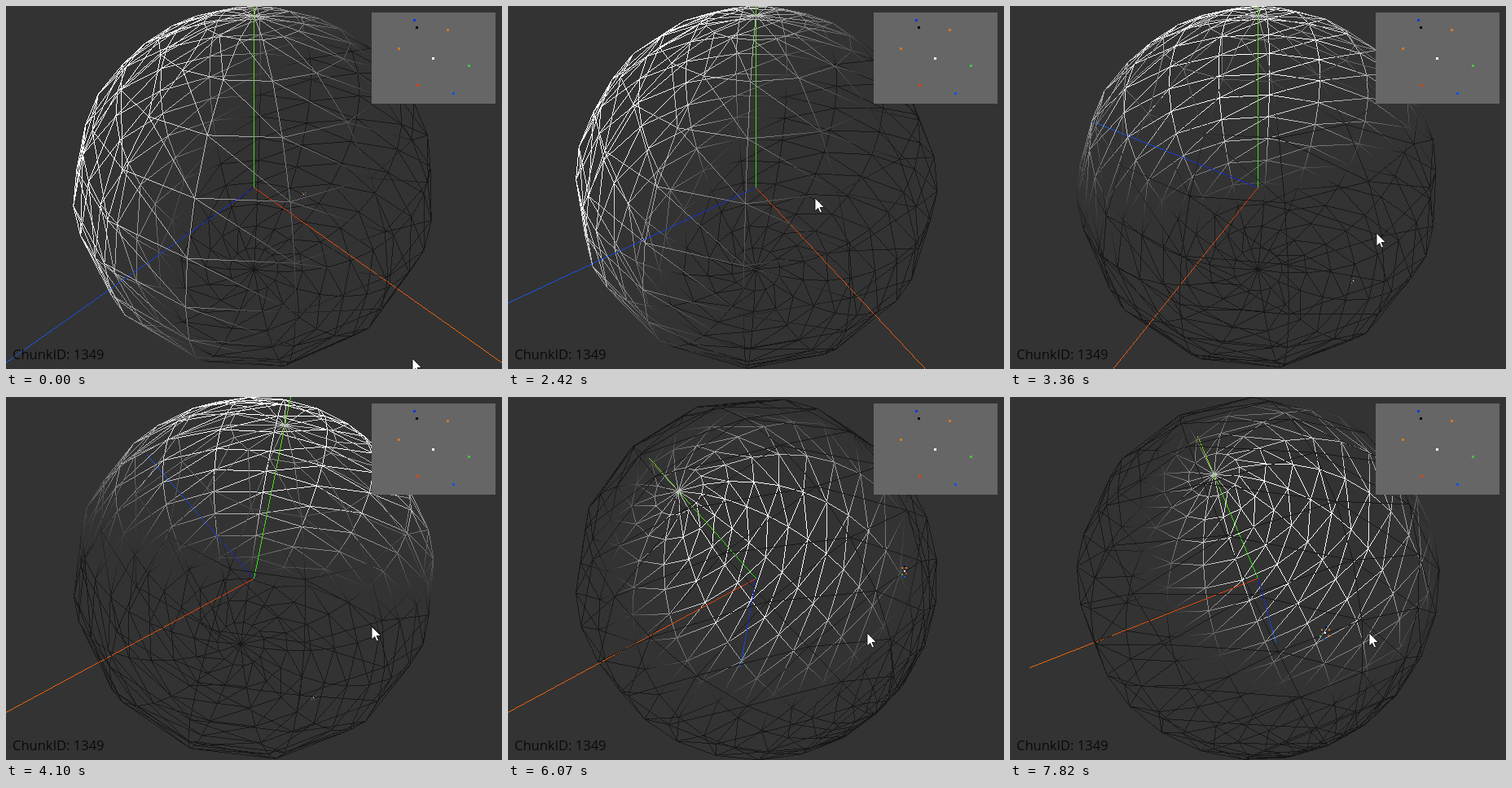
An HTML page with a canvas that plays this animation: 609 px wide and 446 px high, repeating every 8000 ms.

```html
<!DOCTYPE html>
<html lang="en">
<head>
<meta charset="utf-8">
<title>Wireframe sphere</title>
<style>
html, body { margin: 0; width: 100%; height: 100%; overflow: hidden; background: #333; }
canvas { display: block; }
</style>
</head>
<body>
<canvas id="stage" width="609" height="446"></canvas>
<script>
const W = 609, H = 446, LOOP = 8000, SEG = 15, DIST = 2, AXIS = 1.5;
const FOCAL = H / 2 / Math.tan(Math.PI / 6);
const ctx = document.getElementById('stage').getContext('2d');
const image = ctx.createImageData(W, H);
const pixels = new Uint32Array(image.data.buffer);
const nearest = new Float32Array(W * H);

// Starting pose, and moves made in equal steps: [first step, last step, steps, total change]
const rest = { yaw: 45, pitch: 0, spin: 0, roll: 0, x: 499, y: 433 };
const moves = [
  [90, 290, 3, { x: -146, y: -168 }],
  [1120, 1120, 1, { yaw: 5.7 }],
  [1680, 2420, 9, { yaw: 5.9, x: 24, y: -29 }],
  [2600, 2880, 4, { yaw: 31.4, x: 36, y: 21 }],
  [3060, 3360, 4, { yaw: 31.4, x: 37, y: 22 }],
  [3440, 3540, 2, { yaw: 23.2 }],
  [3800, 4100, 3, { pitch: -11.2, x: -1, y: 3 }],
  [4280, 4280, 1, { x: -1, y: 1 }],
  [4840, 5020, 3, { pitch: 8.8, x: -7, y: 7 }],
  [5570, 6070, 6, { pitch: 82.4 }],
  [6250, 6810, 3, { spin: -16.6 }],
  [7170, 7820, 3, { roll: 16.7 }]
];

function poseAt(t) {
  const pose = { ...rest };
  for (const [first, last, steps, change] of moves) {
    const gap = (last - first) / (steps - 1) || 1;
    const done = Math.max(0, Math.min(steps, Math.floor((t - first) / gap + 1.001)));
    for (const name in change) pose[name] += change[name] * done / steps;
  }
  return pose;
}

// Rotate v about coordinate axis n
function turn(v, n, deg) {
  const r = deg * Math.PI / 180, c = Math.cos(r), s = Math.sin(r);
  const p = (n + 1) % 3, q = (n + 2) % 3, out = v.slice();
  out[p] = v[p] * c - v[q] * s;
  out[q] = v[p] * s + v[q] * c;
  return out;
}

const add = (a, b, k) => a.map((x, i) => x + b[i] * k);
const dot = (a, b) => a[0] * b[0] + a[1] * b[1] + a[2] * b[2];
const unit = v => v.map(x => x / Math.hypot(...v));
const cross = (a, b) => [0, 1, 2].map(i => {
  const p = (i + 1) % 3, q = (i + 2) % 3;
  return a[p] * b[q] - a[q] * b[p];
});

const LIGHT = unit([-1, 1, 1]);
const shade = v => Array(3).fill(255 * Math.min(1, 0.095 + 1.1 * Math.max(0, dot(v, LIGHT))));

function vertex(i, j) {
  const u = i * 2 * Math.PI / SEG, w = j * Math.PI / SEG;
  return [-Math.cos(u) * Math.sin(w), Math.cos(w), Math.sin(u) * Math.sin(w)];
}

// Lines: [from, to, colour from, colour to]
const lines = [];
const edge = (a, b) => lines.push([a, b, shade(a), shade(b)]);
for (let j = 0; j < SEG; j++) {
  for (let i = 0; i < SEG; i++) {
    const v = vertex(i, j);
    edge(v, vertex(i, j + 1));
    if (j > 0) edge(v, vertex(i + 1, j));
    if (j > 0 && j < SEG - 1) edge(v, vertex(i + 1, j + 1));
  }
}
const origin = [0, 0, 0];
lines.push([origin, [AXIS, 0, 0], [215, 56, 12], [245, 108, 12]]);
lines.push([origin, [0, AXIS, 0], [40, 225, 20], [130, 215, 25]]);
lines.push([origin, [0, 0, AXIS], [20, 32, 200], [20, 98, 240]]);

// Markers on the map, which also sit as a tiny cluster on the sphere
const marks = [
  [501, 17, '#0a3ae0'], [504, 26, '#000'], [542, 29, '#cf7a2a'], [482, 52, '#cf7a2a'],
  [524, 64, '#fff'], [568, 73, '#4fbb48'], [505, 97, '#dc4310'], [549, 107, '#1052f0']
];
const spot = unit([-0.09, -0.67, -0.737]);
const east = unit(add([1, 0, 0], spot, -spot[0]));
const north = cross(spot, east);
const cluster = marks.map(([x, y, color]) =>
  [add(add(spot, east, (x - 525) * 0.00043), north, (y - 64) * 0.00043), color]);

const arrow = new Path2D('M.5 .5V16.5L4.2 13 6.6 18.5 9 17.4 6.6 12H11.8Z');

// One pixel per step along the longer side, without smoothing, nearest line on top
function plot(a, b, ca, cb) {
  const major = Math.abs(b[0] - a[0]) > Math.abs(b[1] - a[1]) ? 0 : 1;
  if (a[major] > b[major]) [a, b, ca, cb] = [b, a, cb, ca];
  const limit = Math.min(b[major] - 0.5, major ? H : W);
  for (let k = Math.max(0, Math.ceil(a[major] - 0.5)); k < limit; k++) {
    const f = (k + 0.5 - a[major]) / (b[major] - a[major]);
    const other = Math.floor(a[1 - major] + (b[1 - major] - a[1 - major]) * f);
    const [x, y] = major ? [other, k] : [k, other];
    if (x < 0 || y < 0 || x >= W || y >= H) continue;
    const near = a[2] + (b[2] - a[2]) * f, at = y * W + x;
    if (near < nearest[at]) continue;
    nearest[at] = near;
    const g = f * b[2] / near;
    const [red, green, blue] = ca.map((c, i) => Math.round(c + (cb[i] - c) * g));
    pixels[at] = (255 << 24 | blue << 16 | green << 8 | red) >>> 0;
  }
}

function dots(x, y, size, color) {
  ctx.fillStyle = color;
  ctx.fillRect(Math.round(x - size / 2), Math.round(y - size / 2), size, size);
}

function draw(pose) {
  // Screen x, y and closeness
  const project = v => {
    v = turn(v, 2, pose.roll);
    v = turn(v, 1, pose.spin);
    v = turn(v, 0, pose.pitch);
    v = turn(v, 1, -pose.yaw);
    v = turn(v, 0, 45);
    const near = 1 / (DIST - v[2]);
    return [W / 2 + FOCAL * v[0] * near, H / 2 - FOCAL * v[1] * near, near];
  };

  pixels.fill(0xff333333);
  nearest.fill(0);
  for (const [a, b, ca, cb] of lines) plot(project(a), project(b), ca, cb);
  ctx.putImageData(image, 0, 0);

  for (const [v, color] of cluster) {
    const [x, y, near] = project(v);
    dots(x, y, Math.round(2.2 * near), color);
  }

  ctx.fillStyle = '#666';
  ctx.fillRect(449, 8, 152, 112);
  for (const [x, y, color] of marks) dots(x + 0.5, y + 0.5, 3, color);

  ctx.fillStyle = '#0a0a0a';
  ctx.font = '16.5px "Open Sans", "Noto Sans", sans-serif';
  ctx.fillText('ChunkID: 1349', 8, 434);

  ctx.save();
  ctx.translate(Math.round(pose.x) - 0.5, Math.round(pose.y) - 0.5);
  ctx.fillStyle = '#fff';
  ctx.strokeStyle = '#000';
  ctx.lineWidth = 0.8;
  ctx.fill(arrow);
  ctx.stroke(arrow);
  ctx.restore();
}

const start = performance.now();
let shown = '';
function tick() {
  const pose = poseAt((performance.now() - start) % LOOP);
  const key = Object.values(pose).join();
  if (key !== shown) draw(pose);
  shown = key;
  requestAnimationFrame(tick);
}
tick();
</script>
</body>
</html>
```
